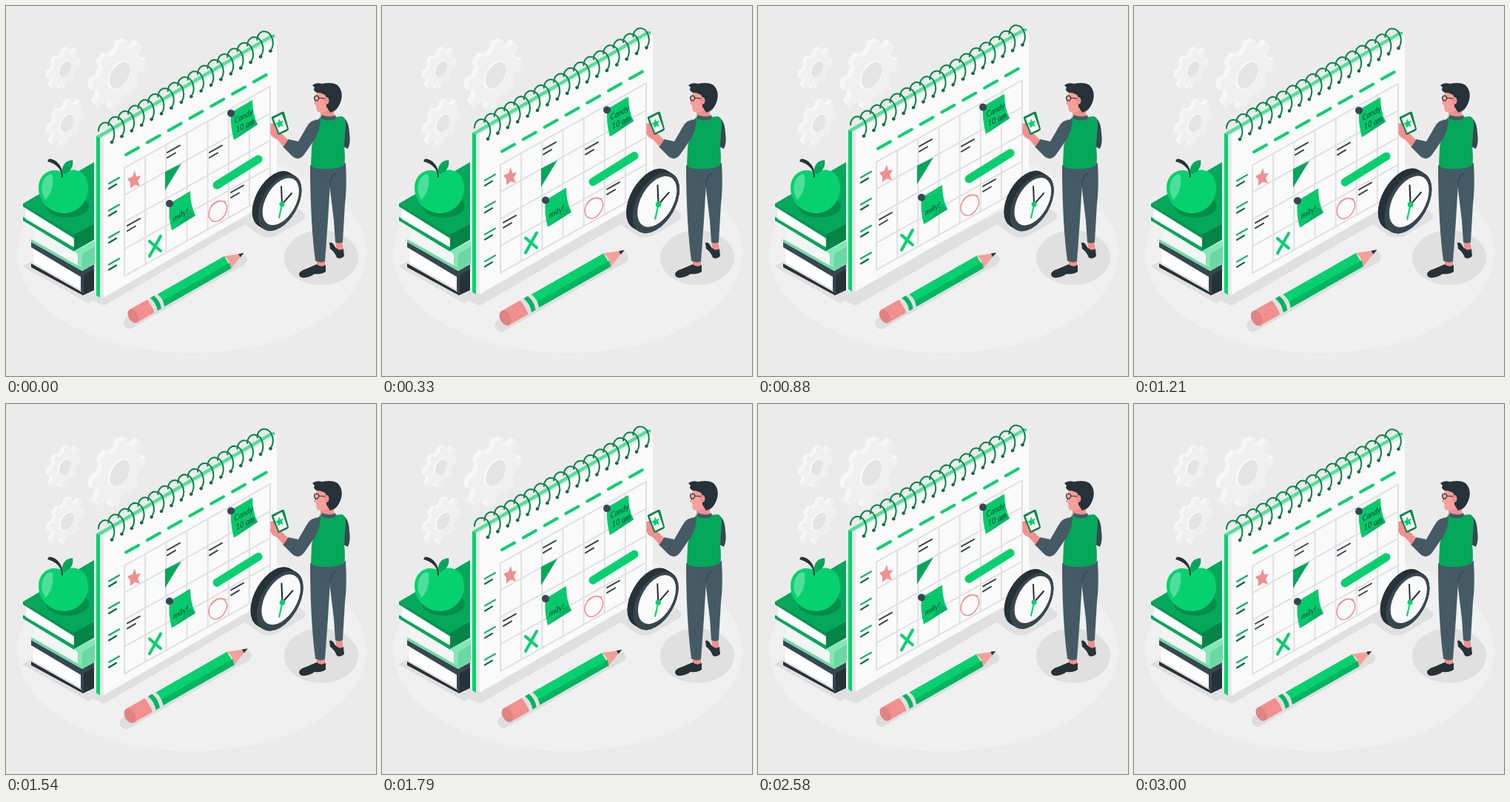
These frames come from a looping animation (500x500 px, 3.04 s). An HTML page:

```html
<!DOCTYPE html>
<html lang="en">
<head>
<meta charset="utf-8">
<title>Calendar planning</title>
<style>
html, body { margin: 0; height: 100%; overflow: hidden; background: #ebebeb; }
svg { display: block; width: 100vw; height: 100vh; }
text { font: italic 400 11px Lato, "Open Sans", sans-serif; fill: #17403a; }
.line { fill: none; stroke-linecap: round; stroke-linejoin: round; }
</style>
</head>
<body>
<svg viewBox="0 0 500 500">
  <ellipse cx="251" cy="333" rx="236" ry="136" fill="#f0f0f0"/>
  <g id="gears"></g>

  <!-- floor shadows -->
  <g fill="#e0e0e0">
    <path d="M22 352l14-8 90 44-14 14z"/>
    <path d="M108 394l24 11 218-126v-14z"/>
    <path d="M322 294l66-24q22 12 14 19l-36 21q-12 6-24-1z"/>
    <ellipse cx="426" cy="340" rx="50" ry="37"/>
  </g>

  <!-- books -->
  <g>
    <path d="M34 348L103 387 119 379V384L104 391 34 353z" fill="#263238"/>
    <path d="M37 328L101 363V383L37 347z" fill="#fff"/>
    <path d="M34 319L103 358 119 349V382L104 391 101 384V366L34 326z" fill="#37474f"/>
    <path d="M105 364L119 356V382L105 390z" fill="#263238"/>
    <path d="M34 315L101 353 120 343V348L103 358 34 319z" fill="#6ddba5"/>
    <path d="M37 298L98 333V351L37 316z" fill="#f2f5f4"/>
    <path d="M92 331L120 317V343L103 354 97 351V336z" fill="#83e8b8"/>
    <path d="M103 335L120 325V344L103 354z" fill="#69d8a2"/>
    <path d="M23 285L92 326V332L23 290z" fill="#05a75a"/>
    <path d="M27 273L90 310V325L27 288z" fill="#fff"/>
    <path d="M23 267L119 211V294L92 310z" fill="#05a75a"/>
    <path d="M23 267L92 309V314L23 271z" fill="#049650"/>
    <path d="M92 309L119 294V316L92 331z" fill="#048446"/>
  </g>

  <!-- apple -->
  <ellipse cx="83" cy="270" rx="29" ry="16" fill="#048c4a"/>
  <path d="M77 226C87 217 111 220 111 246C111 266 95 280 79 280C60 280 44 265 44 246C44 223 67 217 77 226z" fill="#07d16f"/>
  <path d="M49 252C46 238 54 227 62 227C66 239 61 255 53 262z" fill="#4de09a"/>
  <path d="M75 232C76 220 67 213 56 210L58 206.500C69 207 77 217 77 231z" fill="#263238"/>
  <path d="M76 228C74 216 80 209 90 208C92 218 86 225 76 228z" fill="#05a75a"/>

  <g id="calendar">
    <path d="M122 176L358 39 363 39 363 46 132 180 127 178V394L122 391z" fill="#07d16f"/>
    <path d="M122 176L358 39 363 41 127 178z" fill="#55df9c"/>
    <path d="M127 178L361 42 366 43 132 181V395L127 392z" fill="#e8e8e8"/>
    <path d="M132 178L366 43V259L132 394z" fill="#fafafa"/>
    <g id="grid" class="line" stroke="#dfe1e1" stroke-width="2"></g>
    <g id="marks" class="line"></g>
    <path d="M174 222.500l2 8 6-1-4 7 3 7-7-2-6 5v-8l-4-5 7-3z" fill="#f28f8f"/>
    <path d="M215 224L237 213 215 249z" fill="#05a75a"/>
    <g class="line" stroke="#07d16f">
      <path d="M285 242L341 207" stroke-width="11"/>
      <path d="M194 318L209 331M209 311L194 338" stroke-width="4"/>
    </g>
    <path class="line" d="M297 265C286 260 274 270 274 282C276 297 293 293 298 277C302 262 285 259 277 271" stroke="#f28f8f" stroke-width="1.5"/>
    <path d="M304 144L333 127Q333 146 340 160L308 181Q303 164 304 144z" fill="#06c96b"/>
    <path d="M333 152L340 160 308 181 322 168z" fill="#05b460"/>
    <path d="M221 267L249 250Q249 269 256 283L224 303Q219 286 221 267z" fill="#06c96b"/>
    <path d="M249 275L256 283 224 303 238 290z" fill="#05b460"/>
    <text transform="matrix(.85 -.45 .1 1 309 159)">Candy</text>
    <text transform="matrix(.85 -.4 .1 1 311 171)">10 am</text>
    <text transform="matrix(.95 -.55 .1 1 226 292)">mily!</text>
    <g fill="#37474f"><circle cx="304" cy="145" r="5"/><circle cx="221" cy="267" r="5"/></g>
    <g id="rings" class="line" stroke="#048446" stroke-width="2"></g>
  </g>

  <g id="clock">
    <g id="side" fill="#263238"></g>
    <g transform="matrix(.866 -.5 0 1 370 266)">
      <circle r="34" fill="#37474f"/>
      <circle cx="1.500" cy="-1" r="28.500" fill="#fafafa"/>
    </g>
    <g class="line" stroke="#263238" stroke-width="2">
      <path d="M373 268L372 244M373 268L386 253"/>
      <path d="M373 268L369 286" stroke="#07d16f"/>
    </g>
    <circle cx="373" cy="268" r="3.500" fill="#07d16f"/>
  </g>

  <g id="pencil">
    <path class="line" d="M167 428L304 350 318 343" stroke="#dedede" stroke-width="16"/>
    <g transform="translate(172 419) rotate(-29.700)">
      <path d="M0-10H28V10H0z" fill="#f28f8f"/>
      <ellipse rx="6.500" ry="10" fill="#e08383"/>
      <path d="M27-10H43Q47 0 43 10H27Q31 0 27-10z" fill="#e0e0e0"/>
      <path d="M32-10H38Q42 0 38 10H32Q36 0 32-10z" fill="#05b460"/>
      <path d="M43-9.500H147V9.500H43Q47 0 43-9.500z" fill="#07d16f"/>
      <path d="M45 2H149L147 9.500H43Q45 6 45 2z" fill="#05b460"/>
      <path d="M147-9.500L171 0 147 9.500Q151 0 147-9.500z" fill="#f2a099"/>
      <path d="M165-2.500L172 0 165 2.500z" fill="#263238"/>
    </g>
  </g>

  <!-- person -->
  <g>
    <path d="M445 315h9l2 18-9 2z" fill="#f28f8f"/>
    <path d="M437 320Q441 318 445 326Q451 332 456 328L457 338Q452 343 447 340Q444 332 438 328z" fill="#263238"/>
    <path d="M420 340h11v17h-11z" fill="#f28f8f"/>
    <path d="M396 362Q397 358 406 355L420 349Q425 354 432 350V359Q426 363 417 362Q409 368 400 367Q396 366 396 362z" fill="#263238"/>
    <path d="M434 217L459 212Q461 245 458 268L455 319Q450 322 445 319L443 290 437 240z" fill="#455a64"/>
    <path d="M411 215L442 218 438 240 435 290 431 345Q424 348 418 344Q411 290 411 215z" fill="#455a64"/>
    <path class="line" d="M438 240Q438 231 446 226" stroke="#37474f" stroke-width="1.500"/>
    <path d="M453 150Q463 152 464 171Q466 186 462 193L456 190z" fill="#37474f"/>
    <path d="M425 139h18v16h-18z" fill="#f28f8f"/>
    <path d="M427 148L445 150 454 149Q460 151 459 163L457 190Q459 208 457 215Q449 221 428 220Q416 220 412 216L413 191 419 160Q421 153 427 148z" fill="#05a75a"/>
    <path d="M427 147Q437 153 445 147L446 152Q436 157 426 152z" fill="#455a64"/>
    <path d="M425 153Q411 153 406 164L395 183 381 180 374 190 387 203Q394 210 402 202L418 179Q425 165 425 153z" fill="#455a64"/>
    <path d="M381 181L371 171 365 157 358 159 357 172Q360 178 366 180L375 190z" fill="#f28f8f"/>
    <path d="M359 152Q358 150 361 149L373 143Q375 142 376 144L382 166Q382 168 380 169L369 174Q367 174 366 172z" fill="#048446"/>
    <path d="M361.500 152L373 146 380 166 369 171.500z" fill="#fafafa"/>
    <path d="M369 152l2 4 4-1-2 4 2 4-4-1-3 3-1-4-3-2 4-2z" fill="#07d16f"/>
    <path d="M357 159Q361 158 364 164L368 175 360 177z" fill="#f28f8f"/>
    <path d="M421 113L418 124 416 132 419 134 420 142Q423 145 431 143L439 139 441 119 432 111z" fill="#f5a099"/>
    <path d="M414 107Q419 103 427 105Q441 102 448 107Q457 116 452 130Q448 142 438 144L433 136 432 121Q427 117 420 117Q414 114 417 110z" fill="#263238"/>
    <ellipse cx="433" cy="128" rx="3.500" ry="5" fill="#f28f8f"/>
    <path class="line" d="M417 122Q422 120 423 124Q422 129 418 128Q416 126 417 122M423 124L431 125" stroke="#263238" stroke-width="1.200"/>
  </g>
</svg>
<script>
const $ = id => document.getElementById(id);
const repeat = (n, f) => Array.from({ length: n }, (_, i) => f(i)).join('');

// Gears: toothed wheels seen at an angle, extruded to the upper left
function gear(cx, cy, r) {
  const ring = (R, teeth) => 'M' + Array.from({ length: 64 }, (_, i) => {
    const a = i / 32 * Math.PI, q = teeth && i % 8 > 3 ? R * .79 : R;
    return (q * Math.cos(a)).toFixed(1) + ' ' + (q * Math.sin(a)).toFixed(1);
  }).join('L') + 'z';
  const depth = Math.round(r / 7);
  const layer = (k, d, fill) => `<path d="${d}" fill="${fill}"
    transform="matrix(.866 -.5 0 1 ${cx - k} ${cy - k * .577})"/>`;
  const rim = ring(r, true);
  return repeat(depth, i => layer(depth - i, rim, '#f7f7f7')) + layer(0, rim, '#f0f0f0') +
    layer(0, ring(r * .42), '#fafafa') + layer(-.8, ring(r * .38), '#e4e4e4');
}
$('gears').innerHTML = gear(79, 85, 25) + gear(153, 93, 42) + gear(82, 158, 28);

const gridY = x => 219 - (x - 160) * .56;
$('grid').innerHTML =
  repeat(8, i => { const x = 160 + i * 28.15; return `<path d="M${x} ${gridY(x)}v146"/>`; }) +
  repeat(5, i => `<path d="M160 ${219 + i * 36.5}L357 ${gridY(357) + i * 36.5}"/>`);

const stroke = (x, y, dx, dy, color, w) =>
  `<path d="M${x} ${y}l${dx} ${dy}" stroke="${color}" stroke-width="${w}"/>`;
$('marks').innerHTML =
  repeat(7, i => stroke(162 + i * 28.8, 201 - i * 16.4, 17, -9.5, '#07d16f', 4)) +
  repeat(4, i => stroke(139, 240 + i * 36.5, 14, -8, '#05b460', 2.2) +
    stroke(139, 247 + i * 36.5, 10, -6, '#00683a', 2.2)) +
  [[218, 198], [275, 198], [304, 252], [164, 297]].map(([x, y]) =>
    stroke(x, y, 17, -9.5, '#37474f', 2) + stroke(x, y + 7, 11, -6.5, '#37474f', 2)).join('');

$('rings').innerHTML = repeat(17, i => `<g transform="translate(${143 + i * 13.4} ${184 - i * 7.7})">
  <circle r="1.8" fill="#1f4a3b" stroke="#1f4a3b" stroke-width="1"/>
  <path d="M-18-15C-18-23-12-28-6-26C2-24 7-10 0 0"/></g>`);

$('side').innerHTML = repeat(9, i =>
  `<circle r="34" transform="matrix(.866 -.5 0 1 ${362 + i} ${261 + i * .6})"/>`);

// Linear interpolation through [time, value] pairs
function track(keys, t) {
  const i = keys.findIndex(k => k[0] > t);
  if (i < 0) return keys[keys.length - 1][1];
  const [t0, a] = keys[i - 1], [t1, b] = keys[i];
  return a + (b - a) * (t - t0) / (t1 - t0);
}
const floating = [[0, 0], [750, -10], [1500, 0], [2250, -10], [3000, 0]];
const heartbeat = [[0, 1], [420, 1.1], [840, 1], [1260, 1.1], [2100, 1]];
const scaleAt = (id, x, y, s) =>
  $(id).setAttribute('transform', `translate(${x} ${y}) scale(${s}) translate(${-x} ${-y})`);

const start = performance.now();
function draw(now) {
  const t = Math.max(0, now - start) % 3040;
  $('calendar').setAttribute('transform', `translate(0 ${track(floating, t)})`);
  const s = track(heartbeat, t);
  scaleAt('clock', 366, 264, s);
  scaleAt('pencil', 240, 385, s);
  requestAnimationFrame(draw);
}
draw(start);
</script>
</body>
</html>
```
